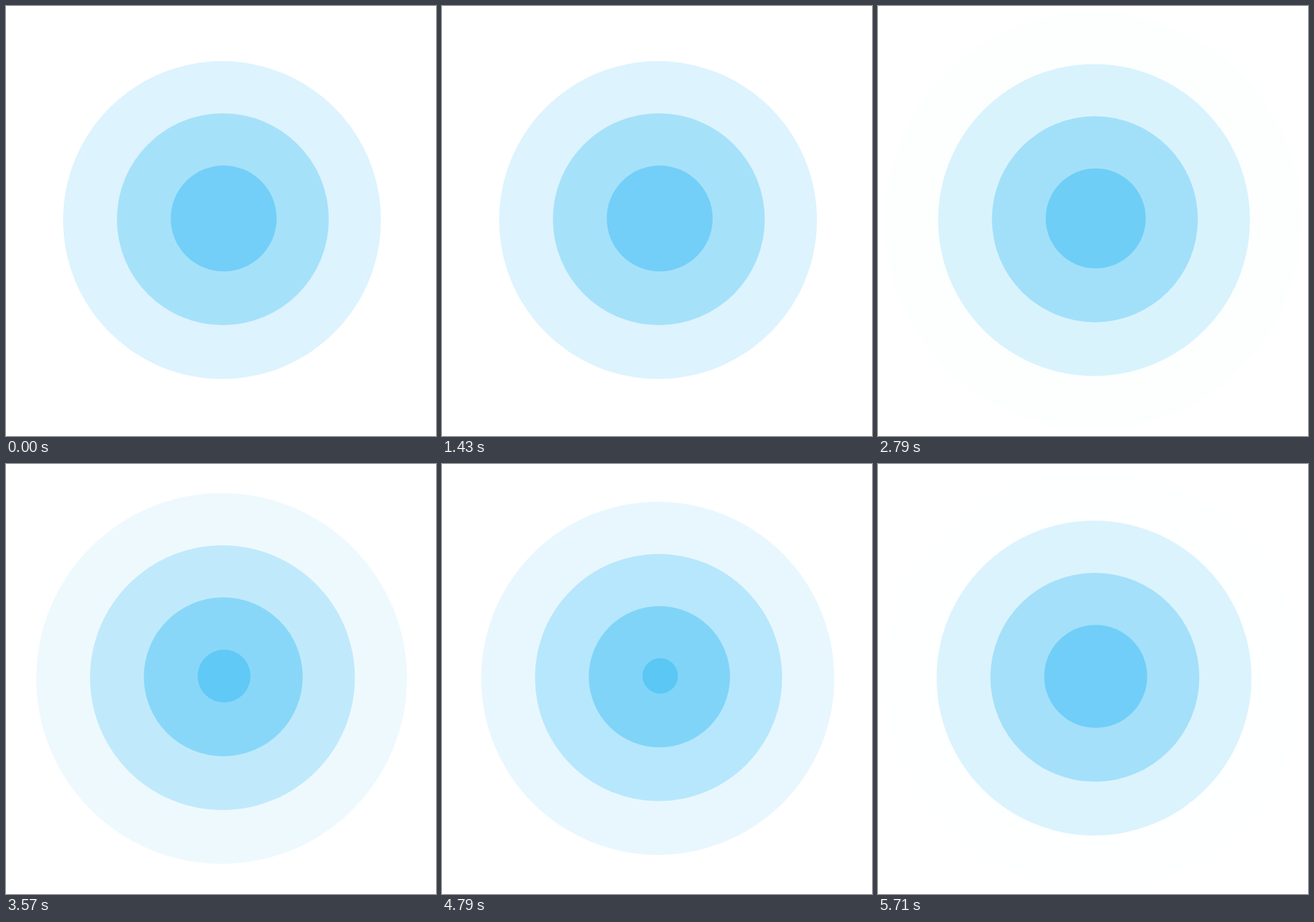
Write an HTML page that moves like this. It is 640x640 px and loops after 5780 ms.

```html
<!DOCTYPE html>
<html lang="en">
<head>
<meta charset="utf-8">
<title>Pulse</title>
<style>
  html, body { margin: 0; width: 100%; height: 100%; overflow: hidden; background: #fff; }
  svg { display: block; width: 100%; height: 100%; }
  circle { fill: #4bc1f4; }
</style>
</head>
<body>
<svg viewBox="0 0 640 640">
  <circle/><circle/><circle/><circle/>
</svg>
<script>
  const LOOP = 5780;    // ms
  const FPS = 14;       // pictures shown per second
  const TICKS = 25;     // growth steps per second
  const LIFE = 144;     // growth steps from birth to fade-out
  const STEP = 2.19;    // radius gained per step
  const rings = [...document.querySelectorAll('circle')];
  const gap = LIFE / rings.length;

  function setRing(ring, age) {
    ring.setAttribute('cx', 325.2 - 0.034 * age);
    ring.setAttribute('cy', 315 + 0.0335 * age);
    ring.setAttribute('r', STEP * age);
    ring.setAttribute('fill-opacity', 0.755 * (1 - age / LIFE));
  }

  function draw(time) {
    // Pictures change on a 10 ms grid, hence the 5 ms rounding offset.
    const picture = Math.floor((time % LOOP + 5) * FPS / 1000);
    const tick = Math.floor(picture * TICKS / FPS + 0.8);
    rings.forEach((ring, i) => setRing(ring, (tick + i * gap) % LIFE));
  }

  const start = performance.now();
  function loop() {
    draw(performance.now() - start);
    requestAnimationFrame(loop);
  }
  loop();
</script>
</body>
</html>
```
